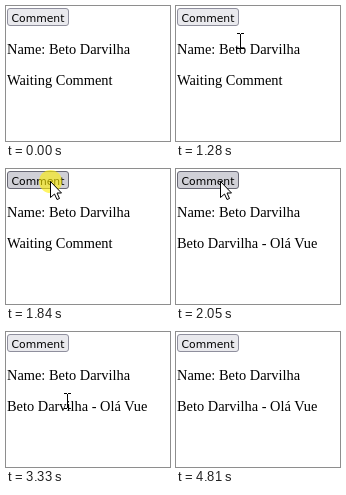
An HTML page with a canvas that plays this animation: 164x135 px, repeating every 5.28 s.

```html
<!DOCTYPE html>
<html lang="pt">
<head>
<meta charset="utf-8">
<style>
html, body { margin: 0; width: 164px; height: 135px; overflow: hidden; background: #fff; }
body { position: relative; color: #000; }
#button {
  position: absolute; left: 1px; top: 2px; width: 62px; height: 18px; box-sizing: border-box;
  border: 1px solid #8f8f9d; border-radius: 3px; background: #e9e9ed;
  font: 10.8px/19px "DejaVu Sans", sans-serif; text-align: center; white-space: pre;
}
#button.hover { background: #d0d0d7; border-color: #676774; }
p {
  position: absolute; left: 1px; margin: 0; white-space: pre;
  font: 14.4px/16px "Liberation Serif", "Times New Roman", serif;
}
#name { top: 35px; }
#message { top: 66px; }
canvas { position: absolute; left: 0; top: 0; }
</style>
</head>
<body>
<div id="button">Comment</div>
<p id="name">Name: Beto Darvilha</p>
<p id="message">Waiting Comment</p>
<canvas id="stage" width="164" height="135"></canvas>
<script>
const LOOP = 5280;
const TICK = 200 / 3; // pointer updates 15 times a second
const ctx = document.getElementById('stage').getContext('2d');
const button = document.getElementById('button');
const message = document.getElementById('message');

// Each move bends from the previous resting point to the next
const entry = { x: 122, y: 128 };
const moves = [
  { start: 740, end: 870, bend: { x: 108, y: 105 }, to: { x: 94, y: 82 } },
  { start: 1070, end: 1560, bend: { x: 59, y: 23 }, to: { x: 44, y: 12 } },
  { start: 2980, end: 2980, bend: { x: 49, y: 36 }, to: { x: 54, y: 61 } },
  { start: 3200, end: 3600, bend: { x: 61, y: 71 }, to: { x: 72, y: 77 } },
  { start: 3870, end: 4280, bend: { x: 100, y: 69 }, to: { x: 136, y: 99 } },
  { start: 4480, end: 4810, bend: { x: 138, y: 117 }, to: { x: 141, y: 136 } }
];

function curve(a, b, c, k) {
  return Math.round((1 - k) ** 2 * a + 2 * k * (1 - k) * b + k * k * c);
}

function pointerAt(t) {
  const i = moves.findLastIndex(m => t >= m.start);
  if (i < 0) return null;
  const { start, end, bend, to } = moves[i];
  const from = i ? moves[i - 1].to : entry;
  const steps = Math.round((end - start) / TICK) + 1;
  const step = Math.floor((t - start + 8) / TICK) + 1;
  const k = Math.min(1, step / steps);
  return { x: curve(from.x, bend.x, to.x, k), y: curve(from.y, bend.y, to.y, k) };
}

function drawBeam(x, y) {
  ctx.fillStyle = '#000';
  for (const dy of [-8, 7]) {
    ctx.fillRect(x - 3, y + dy, 3, 1);
    ctx.fillRect(x + 1, y + dy, 3, 1);
  }
  ctx.fillRect(x, y - 7, 1, 14);
}

function drawArrow(x, y) {
  ctx.save();
  ctx.translate(x, y);
  const shape = new Path2D('M.5 .5V16.5L4.5 13L7 18.5L9.5 17.5L7 12H11.5Z');
  ctx.fillStyle = '#fff';
  ctx.fill(shape);
  ctx.strokeStyle = '#000';
  ctx.stroke(shape);
  ctx.restore();
}

function drawClick(t) {
  const k = (t - 1630) / 420;
  if (k < 0 || k >= 1) return;
  ctx.globalAlpha = 0.6 * Math.sin(Math.PI * k);
  ctx.fillStyle = '#ffee00';
  ctx.beginPath();
  ctx.arc(44.5, 12.5, 11.5, 0, Math.PI * 2);
  ctx.fill();
  ctx.globalAlpha = 1;
}

function draw(t) {
  ctx.clearRect(0, 0, 164, 135);
  button.classList.toggle('hover', t >= 1420 && t < 3200);
  message.textContent = t >= 1910 ? 'Beto Darvilha - Olá Vue' : 'Waiting Comment';
  drawClick(t);
  const p = pointerAt(t);
  if (!p) return;
  const onText = (p.y > 33 && p.y < 54) || (p.y > 60 && p.y < 87);
  (onText ? drawBeam : drawArrow)(p.x, p.y);
}

const origin = performance.now();
function frame() {
  draw((performance.now() - origin) % LOOP);
  requestAnimationFrame(frame);
}
draw(0);
requestAnimationFrame(frame);
</script>
</body>
</html>
```
